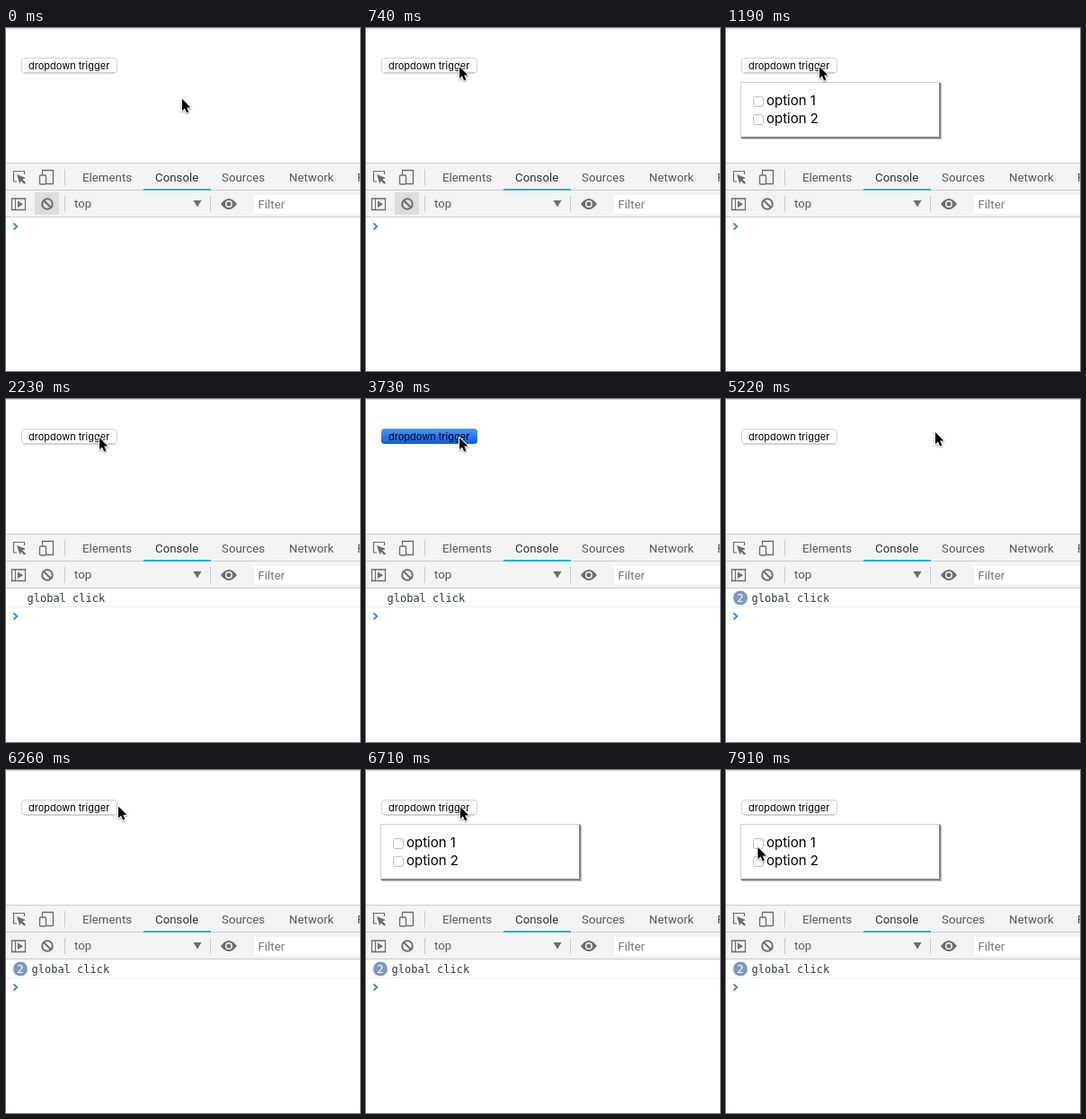
Recreate the animation shown at these times as an HTML page with a canvas. Size 394 by 382 pixels, loop 8 s.

```html
<!DOCTYPE html>
<html lang="en">
<head>
<meta charset="utf-8">
<title>Dropdown and console</title>
<style>
  html, body { margin: 0; width: 100%; height: 100%; overflow: hidden; background: #fff; }
  canvas { display: block; }
</style>
</head>
<body>
<canvas id="stage" width="394" height="382"></canvas>
<script>
const ctx = document.getElementById('stage').getContext('2d');
const LOOP = 8000, TICK = 149;
const UI = 'Inter, sans-serif', TOOLS = 'Roboto, sans-serif';
const MONO = '"DejaVu Sans Mono", monospace';
const ICON = '#6e6e6e';

// Pointer moves: first tick, last tick, destination.
const MOVES = [
  [3, 5, 104, 43],
  [27, 30, 233, 37],
  [40, 43, 105, 41],
  [47, 53, 35.5, 86]
];
const PRESSES = [7, 14, 25, 44];

function rect(x, y, w, h, color) {
  ctx.fillStyle = color;
  ctx.fillRect(x, y, w, h);
}

function text(str, x, y, font, color) {
  ctx.font = font;
  ctx.fillStyle = color;
  ctx.fillText(str, x, y);
}

function trace(points, closed) {
  ctx.beginPath();
  points.forEach(([x, y]) => ctx.lineTo(x, y));
  if (closed) ctx.closePath();
}

function polygon(points, color) {
  trace(points, true);
  ctx.fillStyle = color;
  ctx.fill();
}

function line(points, color, width) {
  trace(points);
  ctx.strokeStyle = color;
  ctx.lineWidth = width;
  ctx.stroke();
}

function rounded(x, y, w, h, r, fill, stroke, width = 1) {
  ctx.beginPath();
  ctx.roundRect(x, y, w, h, r);
  if (fill) { ctx.fillStyle = fill; ctx.fill(); }
  if (stroke) { ctx.strokeStyle = stroke; ctx.lineWidth = width; ctx.stroke(); }
}

function circle(x, y, r, fill) {
  ctx.beginPath();
  ctx.arc(x, y, r, 0, Math.PI * 2);
  ctx.fillStyle = fill;
  ctx.fill();
}

function drawTrigger(pressed) {
  if (pressed) {
    const blue = ctx.createLinearGradient(0, 33, 0, 50);
    blue.addColorStop(0, '#4b97fb');
    blue.addColorStop(1, '#0b5ce2');
    rounded(17, 33, 107, 17, 3.5, blue);
  } else {
    rounded(17.5, 33.5, 106, 16.5, 3.5, '#fff', '#d2d2d2');
    line([[20, 50], [121, 50]], '#bcbcbc', 1);
  }
  text('dropdown trigger', 25, 46, '11px ' + UI, '#000');
}

function drawDropdown() {
  rect(16, 60, 223, 63, '#cfcfcf');
  rect(18, 122, 222, 2, '#b9b9b9');
  rect(238, 62, 2, 61, '#b9b9b9');
  rect(17, 121, 222, 2, '#858585');
  rect(237, 61, 2, 62, '#858585');
  rect(17, 61, 220, 60, '#fff');
  [1, 2].forEach(n => {
    const y = 56 + n * 20;
    rounded(30.5, y + 0.5, 11, 11, 2.5, '#fff', '#bdbdbd');
    text('option ' + n, 45, y + 10, '15px ' + UI, '#000');
  });
}

function drawInspectIcon() {
  line([[12, 171], [8.5, 171], [8.5, 159.5], [20.5, 159.5], [20.5, 163]], ICON, 1.2);
  polygon([[12, 163], [22, 167], [18.4, 168.6], [22, 172.2], [20.4, 173.8], [16.8, 170.2], [15.3, 173.5]], ICON);
}

function drawDeviceIcon() {
  line([[40.5, 163], [40.5, 158.5], [52.5, 158.5], [52.5, 173.5], [45, 173.5]], ICON, 1.3);
  rounded(37.5, 164, 7, 10, 1, '#f3f3f3', ICON, 1.3);
}

function drawEye() {
  ctx.beginPath();
  ctx.moveTo(239, 196);
  ctx.quadraticCurveTo(248, 184, 257, 196);
  ctx.quadraticCurveTo(248, 208, 239, 196);
  ctx.fillStyle = ICON;
  ctx.fill();
  circle(248, 196, 4, '#f3f3f3');
  circle(248, 196, 2.5, ICON);
}

function drawToolbars(clearHover) {
  rect(0, 150, 394, 61, '#f3f3f3');
  [150, 180, 210].forEach(y => rect(0, y, 394, 1, '#cccccc'));

  drawInspectIcon();
  drawDeviceIcon();
  rect(65, 157, 1, 18, '#cccccc');
  [['Elements', 85], ['Console', 166], ['Sources', 240], ['Network', 315], ['Performance', 391]]
    .forEach(([name, x]) =>
      text(name, x, 171, '13.3px ' + TOOLS, name === 'Console' ? '#333' : '#5a5a5a'));
  rect(153, 179, 75, 2, '#1ab0e4');

  rounded(6.5, 190, 15, 12.5, 0, null, ICON, 1.3);
  line([[10.5, 190], [10.5, 202]], ICON, 1.2);
  polygon([[13, 192.5], [19, 196.2], [13, 200]], ICON);

  if (clearHover) rect(32, 183, 27, 25, '#dddddd');
  ctx.beginPath();
  ctx.arc(46, 196, 5.8, 0, Math.PI * 2);
  ctx.strokeStyle = ICON;
  ctx.lineWidth = 2;
  ctx.stroke();
  line([[42, 192], [50, 200]], ICON, 2);

  rect(65, 187, 1, 18, '#cccccc');
  text('top', 76, 200, '13.3px ' + TOOLS, '#5a5a5a');
  polygon([[208.5, 192], [217.5, 192], [213, 199.5]], ICON);
  rect(227, 187, 1, 18, '#cccccc');
  drawEye();
  rect(276, 186, 118, 21, '#fff');
  text('Filter', 280.5, 201, '13.3px ' + TOOLS, '#777');
}

function drawConsole(count) {
  let y = 221;
  if (count) {
    if (count > 1) {
      circle(16, 221.5, 8, '#7f98c0');
      text(count, 12.3, 226, '12px ' + MONO, '#fff');
    }
    text('global click', count > 1 ? 28.5 : 23.5, 226, '12px ' + MONO, '#303942');
    rect(0, 231, 394, 1, '#f0f0f0');
    y = 242;
  }
  line([[8.5, y - 3.5], [12.3, y], [8.5, y + 3.5]], '#3f86f0', 1.9);
}

function pointerAt(tick) {
  let [x, y] = [196, 79];
  for (const [first, last, toX, toY] of MOVES) {
    if (tick < first) break;
    const p = Math.min(1, (tick - first + 1) / (last - first + 1));
    const eased = p * p * (3 - 2 * p);
    x += (toX - x) * eased;
    y += (toY - y) * eased;
  }
  return [x, y];
}

function drawPointer(x, y) {
  ctx.save();
  ctx.translate(x, y);
  ctx.lineJoin = 'round';
  trace([[0, 0], [0, 13.2], [3, 10.4], [5.2, 15.4], [7.4, 14.4], [5.3, 9.6], [9.4, 9.4]], true);
  ctx.shadowColor = 'rgba(0,0,0,.4)';
  ctx.shadowBlur = 2;
  ctx.shadowOffsetY = 1;
  ctx.strokeStyle = '#fff';
  ctx.lineWidth = 2;
  ctx.stroke();
  ctx.shadowColor = 'transparent';
  ctx.fillStyle = '#000';
  ctx.fill();
  ctx.restore();
}

function draw(now) {
  const tick = Math.floor((now % LOOP + 6) / TICK);
  const open = (tick >= 8 && tick < 15) || (tick >= 26 && tick < 35) || tick >= 45;
  const count = tick < 15 ? 0 : tick < 35 ? 1 : 2;

  rect(0, 0, 394, 382, '#fff');
  rect(0, 0, 394, 1, '#d4d4d4');
  drawTrigger(PRESSES.includes(tick));
  if (open) drawDropdown();
  drawToolbars(tick < 7);
  drawConsole(count);
  drawPointer(...pointerAt(tick));
}

const start = performance.now();
function frame() {
  draw(performance.now() - start);
  requestAnimationFrame(frame);
}
frame();
</script>
</body>
</html>
```
